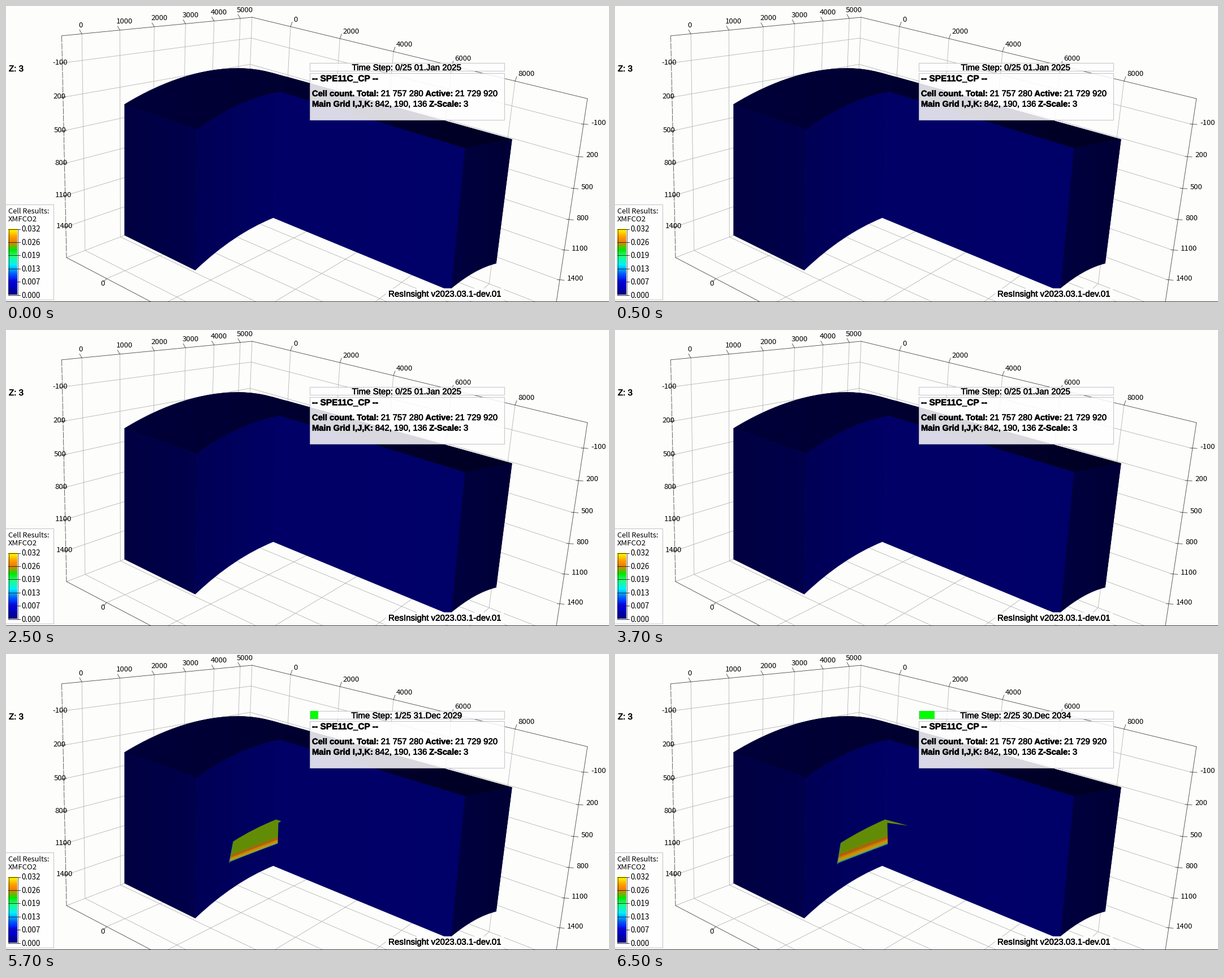
A matplotlib script for the animation above (8 s loop, 1066 by 525 pixels).

```python
import numpy as np
import matplotlib.pyplot as plt
from matplotlib.animation import FuncAnimation
from matplotlib.colors import LinearSegmentedColormap, to_rgb
from matplotlib.patches import PathPatch, Rectangle
from matplotlib.path import Path
from matplotlib.patheffects import withStroke

W, H, DPI = 1066, 525, 100
PX = 72 / DPI
GRID, AXIS = "#b0b0b0", "#3c3c3c"
TICK_FONT, INFO_FONT = "Noto Sans CJK JP", "Liberation Sans"
MEDIUM = [withStroke(linewidth=0.4, foreground="black")]

fig = plt.figure(figsize=(W / DPI, H / DPI), dpi=DPI, facecolor="#fdfdfc")
ax = fig.add_axes([0, 0, 1, 1])
ax.axis("off")


def line(p, q, color=GRID, width=0.8, z=1):
    return ax.plot([p[0], q[0]], [p[1], q[1]], color=color, lw=width * PX, zorder=z)[0]


def label(x, y, s, size=13.2):
    return ax.text(x, y, s, fontsize=size * PX, family=TICK_FONT, zorder=6)


def info(x, y, s, size=15.1, **kw):
    return ax.text(x, y, s, fontsize=size * PX, family=INFO_FONT, zorder=6,
                   path_effects=MEDIUM, **kw)


def box(x0, y0, x1, y1, z=5, **kw):
    return ax.add_patch(Rectangle((x0, y0), x1 - x0, y1 - y0, zorder=z, **kw))


def picture(rgb, extent, z, clip=None):
    im = ax.imshow(rgb, extent=extent, aspect="auto", zorder=z, interpolation="bilinear")
    if clip is not None:
        im.set_clip_path(clip)
    return im


def shape(start, *segments):
    """Closed path of straight (1 point), quadratic (2) and cubic (3) segments."""
    verts, codes = [start], [Path.MOVETO]
    for seg in segments:
        verts += seg
        codes += [(Path.LINETO, Path.CURVE3, Path.CURVE4)[len(seg) - 1]] * len(seg)
    return Path(np.subtract(verts + [start], 0.5), codes + [Path.CLOSEPOLY])


# Camera: the back corner and three vanishing points
CORNER = np.array([435, 20])
VANISH = np.array([[1480, -82], [-1685, -496], [216, 5490]])
RATE = np.array([0.0408 / 1000, -0.0372 / 2000, 0.0087 / 300])
X0, X1 = -490, 5480
Y0, Y1 = -1670, 10080
Z0, Z1 = -334, 1700


def project(x, y, z):
    w = (np.array([x, y, z]) - (X1, Y0, Z0)) * RATE
    return (CORNER + w @ VANISH) / (1 + w.sum())


def edge(a, b, color=GRID):
    return line(project(*a), project(*b), color)


def tick(at, inner, outer, text, s):
    """Tick mark around a point of an axis, with its label beside it."""
    p = project(*at)
    line(p + inner, p + outer, AXIS)
    label(*(p + text), str(s))


for x in range(0, 6000, 1000):
    edge((x, Y0, Z0), (x, Y0, Z1))
    edge((x, Y0, Z1), (x, Y1, Z1))
    tick((x, Y0, Z0), (0, 0), (-4, -7), (-6, -11.5), x)

for y in range(0, 10000, 2000):
    edge((X1, y, Z0), (X1, y, Z1))
    edge((X1, y, Z1), (X0, y, Z1))
    tick((X1, y, Z0), (0, 0), (3, -8), (5, -9), y)
tick((X0, 0, Z1), (0, 0), (-5, 5), (-11, 12.5), 0)

for z in range(-100, 1700, 300):
    edge((X0, Y0, z), (X1, Y0, z))
    edge((X1, Y0, z), (X1, Y1, z))
    tick((X0, Y0, z), (-5, 1), (5, -1), (-17.5, 2.5), z)
    tick((X1, Y1, z), (-4, -1), (8, 0), (13, 0.5), z)

edge((X1, Y0, Z0), (X1, Y0, Z1))
edge((X0, Y0, Z1), (X1, Y0, Z1))
edge((X1, Y0, Z1), (X1, Y1, Z1))
edge((X0, Y0, Z0), (X1, Y0, Z0), AXIS)
edge((X1, Y0, Z0), (X1, Y1, Z0), AXIS)
edge((X1, Y1, Z0), (X1, Y1, Z1), AXIS)
edge((X0, Y0, Z1), (X0, Y1, Z1), AXIS)
edge((X0, Y0, Z0), (X0, Y0, Z1), AXIS).set_dashes((14, 2))


# Reservoir block with a corner cut out
def face(path, left, right):
    """One side of the block, shaded from left to right."""
    mid = np.add(to_rgb(left), to_rgb(right)) / 2
    patch = ax.add_patch(PathPatch(path, fc=mid, ec=mid, lw=0.3, zorder=2))
    x0, y0, x1, y1 = path.get_extents().extents
    ramp = np.linspace(to_rgb(left), to_rgb(right), 64)
    picture(ramp[None], (x0, x1, y1, y0), 2, patch)


west, south, notch = (210, 175), (338, 220), (485, 153)
east, front = (895, 237), (812, 253)
west_low, south_low, notch_low = (210, 407), (335, 469), (473, 376)
east_low, front_low = (867, 457), (788, 501)
arch, arch_low = (415, 164), (402, 405)

face(shape(west, [(280, 132), (350, 110), (415, 111)], [(455, 112), (475, 121), (500, 127)],
           [east], [front], [notch], [arch, south]), "#00003a", "#000024")
face(shape(west, [south], [south_low], [west_low]), "#000042", "#00004c")
face(shape(south, [arch, notch], [notch_low], [arch_low, south_low]), "#000056", "#000066")
face(shape(notch, [front], [front_low], [(775, 501)], [notch_low]), "#000066", "#00006a")
face(shape(front, [east], [east_low], [(830, 466), front_low]), "#000040", "#000036")

# Gas plume, coloured by height above its lower edge
BANDS = LinearSegmentedColormap.from_list("bands", [
    (0, "#0010a0"), (0.09, "#1c9098"), (0.2, "#b8a010"), (0.4, "#cc8c08"),
    (0.62, "#b85a08"), (0.85, "#6c8a08"), (1, "#628c06")])


def plume(grow, depth, tip):
    """Plume spread by grow pixels, with hot bands of the given depth."""
    top, low = (402 - grow, 333 + grow), (395 - 0.7 * grow, 370 + grow)
    low_end = (481 + 0.7 * grow, 337 + 0.5 * grow)
    path = shape(low, [top], [(438, 310 + grow / 2), (478, 294)], [tip], [(482, 300)],
                 [low_end], [(438, 352 + grow), low])
    patch = ax.add_patch(PathPatch(path, fc="none", ec="none", zorder=3))
    x0, x1, y0, y1 = 385, 525, 288, 380
    x, y = np.meshgrid(np.arange(x0, x1) + 0.5, np.arange(y0, y1) + 0.5)
    height = low[1] + (low_end[1] - low[1]) * (x - low[0]) / (low_end[0] - low[0]) - y
    bands = picture(BANDS(np.clip(height / depth, 0, 1))[..., :3], (x0, x1, y1, y0), 3, patch)
    return [bands, line(top, low, "#2c8f78", 1, 3.2)]


plumes = [[], plume(0, 16, (487, 297)), plume(2.5, 21, (519, 305))]

# Info panels
glass = dict(fc=(1, 1, 1, 0.85), ec="#b4b4bc", lw=0.8 * PX)
strip = box(536.5, 100.5, 880.5, 114.5, **glass)
box(536.5, 118.5, 880.5, 201.5, **glass)
bar = box(538, 101, 538, 114.5, fc="#00ff00", ec="none")
status = info(708.5, 114, "", ha="center")
status.set_clip_path(strip)


def row(y, *parts):
    """Bold captions and plain values in turn, each set after the last."""
    prev = info(541, y, parts[0], 14.7, weight="bold")
    for i, s in enumerate(parts[1:], 1):
        style = dict(weight="normal", fontsize=15 * PX) if i % 2 else dict(
            weight="bold", fontsize=14.7 * PX)
        prev = ax.annotate(s, (1, y), xycoords=(prev, "data"), xytext=(3.5, 0),
                           textcoords="offset pixels", va="baseline", family=INFO_FONT,
                           annotation_clip=False, path_effects=MEDIUM, zorder=6, **style)


info(541, 133.5, "-- SPE11C_CP --", 15.4, weight="bold")
row(160, "Cell count. Total:", "21 757 280", "Active:", "21 729 920")
row(178.5, "Main Grid I,J,K:", "842, 190, 136", "Z-Scale:", "3")

info(5, 116, "Z: 3")
box(672, 500.5, 880, 522, fc=(1, 1, 1, 0.92), ec="none")
info(676, 515.5, "ResInsight v2023.03.1-dev.01")

# Colour legend
box(-2, 351.5, 83.5, 520.5, fc=(1, 1, 1, 0.85), ec="#b4b4b4", lw=0.8 * PX)
label(4, 367.5, "Cell Results:", 12.9)
label(4, 382, "XMFCO2")
rainbow = LinearSegmentedColormap.from_list("rainbow", [
    (0, "#000080"), (0.2, "#0000f0"), (0.32, "#0060ff"), (0.45, "#00f0ff"),
    (0.58, "#20ff80"), (0.68, "#00e800"), (0.8, "#e88000"), (0.88, "#ff9c00"),
    (1, "#ffff00")])
picture(rainbow(np.linspace(1, 0, 117))[:, None, :3], (4, 20, 512.5, 395.5), 6)
box(4.5, 395.5, 20.5, 512.5, z=6.5, fc="none", ec="#333333", lw=0.8 * PX)
levels = ["0.032", "0.026", "0.019", "0.013", "0.007", "0.000"]
for y, s in zip(np.linspace(395.5, 512.5, 6), levels):
    line((4, y), (25, y), "#222222", 0.9, 6.6)
    label(27, y + 5, s, 13.4)

line((0, 523.5), (W, 523.5), "#3a3a3a", 1, 7)
ax.set_xlim(0, W)
ax.set_ylim(H, 0)

STEPS = ["0/25 01.Jan 2025", "1/25 31.Dec 2029", "2/25 30.Dec 2034"]
FRAME_MS = 500


def draw(i):
    ms = i * FRAME_MS
    step = int(ms >= 4500) + int(ms >= 6500)
    status.set_text("Time Step: " + STEPS[step])
    bar.set_width(343 * step / 25)
    for k, parts in enumerate(plumes):
        for part in parts:
            part.set_visible(k == step)
    return [status, bar] + sum(plumes, [])


anim = FuncAnimation(fig, draw, frames=8000 // FRAME_MS, interval=FRAME_MS,
                     repeat=True, repeat_delay=0)
plt.show()
```
